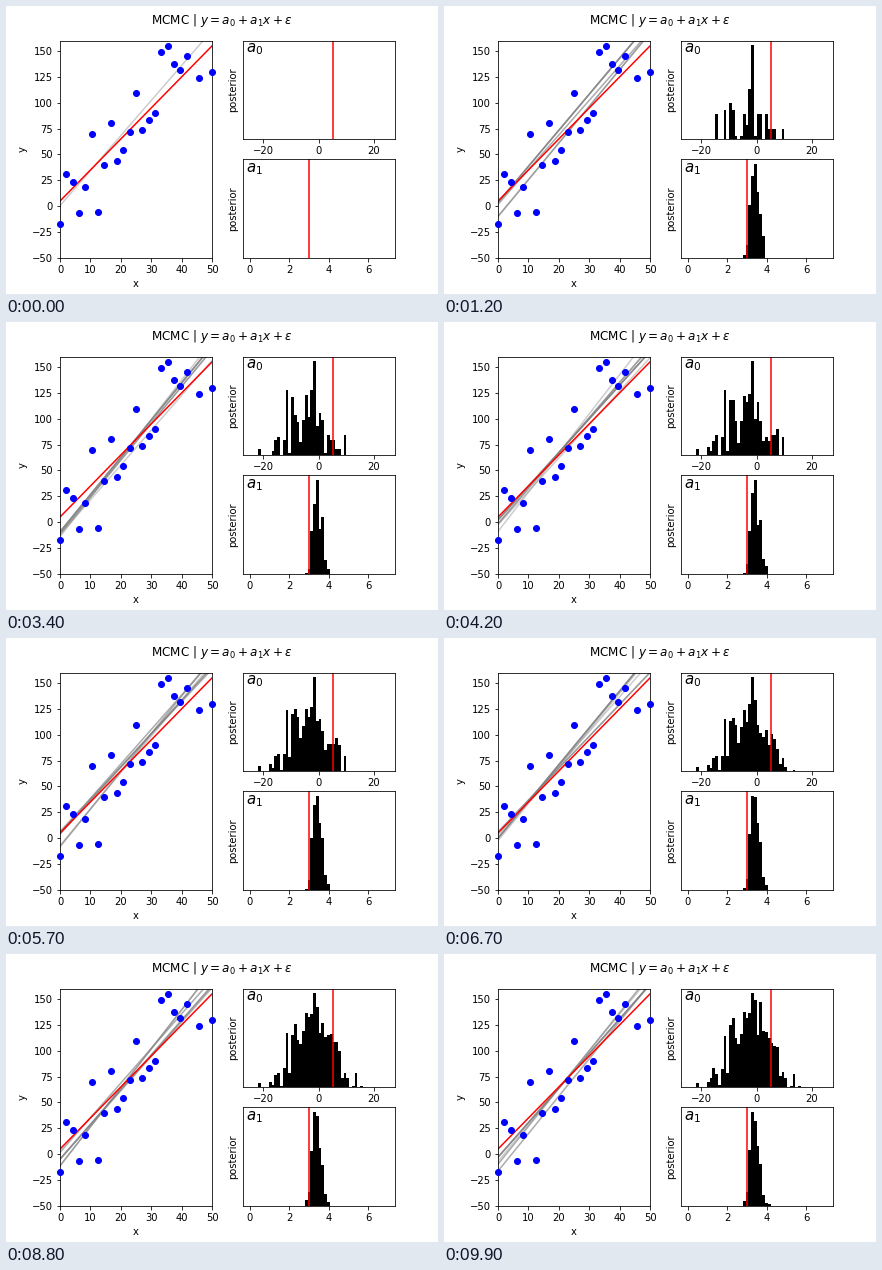
A matplotlib script for the animation above (10000 ms loop, 432x288 px).

```python
import numpy as np
import matplotlib.pyplot as plt
from matplotlib.animation import FuncAnimation

FRAMES, INTERVAL = 100, 100
PER_FRAME, SHOWN = 10, 10
BINS = 50
A0, A1, SIGMA = 5, 3, 20

# Noisy observations of a straight line
np.random.seed(123)
x = np.linspace(0, 50, 25)
y = A0 + A1 * x + np.random.normal(0, SIGMA, x.size)


def make_chain():
    """Sticky chain of (intercept, slope) around a slowly drifting centre."""
    rng = np.random.default_rng(5)
    keys = [0, 8, 12, 24, 42, 57, 78, 99]
    centre = [-1, -2, 3, -8, -3, -2, 3, -4]
    xx = x @ x
    chain = [(0.5, 3.39)]
    for n in range(1, FRAMES * PER_FRAME):
        if rng.random() < 0.55:
            chain.append(chain[-1])
            continue
        a0 = rng.normal(np.interp(n / PER_FRAME, keys, centre), 6)
        chain.append((a0, rng.normal(x @ (y - a0) / xx, SIGMA / np.sqrt(xx))))
    return np.array(chain)


chain = make_chain()

fig = plt.figure(figsize=(6, 4), dpi=72, facecolor="white")
fig.subplots_adjust(left=0.125, right=0.9, bottom=0.125, top=0.88,
                    wspace=0.2, hspace=0.2)
fig.suptitle(r"MCMC | $y = a_0 + a_1 x + \epsilon$", fontsize=12)

ax = fig.add_subplot(1, 2, 1)
ax.set(xlim=(0, 50), ylim=(-50, 160), xlabel="x", ylabel="y",
       xticks=range(0, 51, 10), yticks=range(-50, 151, 25))
fits = [ax.plot([], [], color="gray", alpha=0.4, lw=1.5, zorder=1.5)[0]
        for _ in range(SHOWN)]
ends = np.array([0, 50])
ax.plot(ends, A0 + A1 * ends, "r", lw=1.5, zorder=2)
inside = y < 160
ax.plot(x[inside], y[inside], "bo", ms=6, zorder=3, clip_on=False)


class Posterior:
    """Histogram panel of one parameter, scaled to its tallest bar."""

    def __init__(self, slot, name, lo, hi, ticks, truth, label_y):
        axis = fig.add_subplot(2, 2, slot)
        pad = 0.05 * (hi - lo)
        axis.set(xlim=(lo - pad, hi + pad), ylim=(0, 1.05), xticks=ticks,
                 yticks=[], ylabel="posterior")
        self.edges = np.linspace(lo, hi, BINS + 1)
        self.bars = axis.bar(self.edges[:-1], np.zeros(BINS), color="black",
                             width=self.edges[1] - lo, align="edge")
        axis.axvline(truth, color="r", lw=1.5)
        axis.text(0.02, label_y, name, fontsize=15, transform=axis.transAxes)

    def show(self, samples):
        counts = np.histogram(samples, self.edges)[0]
        for bar, h in zip(self.bars, counts / max(counts.max(), 1)):
            bar.set_height(h)


panels = [Posterior(2, "$a_0$", -25, 25, [-20, 0, 20], A0, 0.877),
          Posterior(4, "$a_1$", 0, 7, [0, 2, 4, 6], A1, 0.865)]


def update(i):
    last = i * PER_FRAME + 1
    recent = chain[max(0, last - SHOWN):last]
    for k, line in enumerate(fits):
        if k < len(recent):
            a0, a1 = recent[k]
            line.set_data(ends, a0 + a1 * ends)
        else:
            line.set_data([], [])
    for panel, values in zip(panels, chain[1:last].T):
        panel.show(values)


anim = FuncAnimation(fig, update, frames=FRAMES, interval=INTERVAL,
                     repeat=True, repeat_delay=0, blit=False)
plt.show()
```
